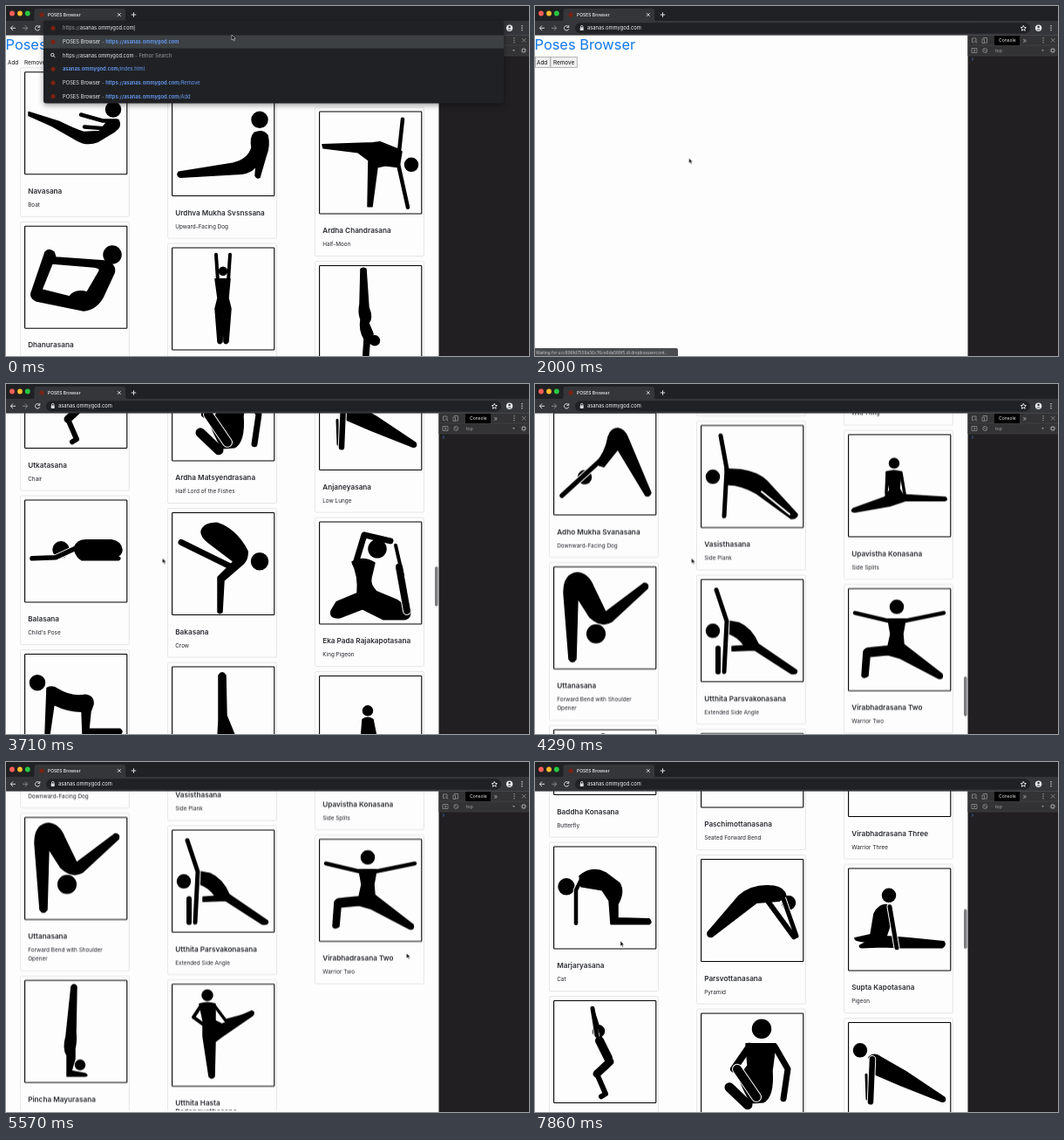
Write an HTML page that moves like this. It is 600 px wide and 401 px high and loops after 8000 ms.

```html
<!DOCTYPE html>
<html lang="en">
<head>
<meta charset="utf-8">
<title>Poses Browser</title>
<style>
@property --s { syntax: '<number>'; inherits: true; initial-value: 0; }
html, body { margin: 0; width: 100%; height: 100%; overflow: hidden; background: #fefdfe; }
svg { display: block; width: 600px; height: 401px; font: 5.8px Inter, "Open Sans", sans-serif; animation: scroll 8s -5ms infinite; }
text { white-space: pre; }

/* everything moves in 56 even steps per loop */
.doc { transform: translateY(calc(var(--s) * -1px)); }
.thumb { transform: translateY(calc(var(--s) * .1283px)); animation: bar 8s -5ms step-end infinite; }
.cards { animation: cards 8s -5ms step-end infinite; }
.late { animation: late 8s -5ms step-end infinite; }
.wait { animation: wait 8s -5ms step-end infinite; }
.menu { animation: menu 8s -5ms step-end infinite; filter: drop-shadow(0 2px 3px rgba(0,0,0,.4)); }
.hand, .over { animation: over 8s -5ms step-end infinite; }
.arrow, .plain { animation: plain 8s -5ms step-end infinite; }
.col2 { animation: settle 8s -5ms step-end infinite; }
.cursor { animation: move 8s -5ms infinite; }

@keyframes scroll {
  0%, 35.714% { --s: 0; animation-timing-function: step-end; }
  37.5% { --s: 137; animation-timing-function: steps(5); }
  46.429% { --s: 1365; animation-timing-function: steps(4); }
  53.571% { --s: 2347.5; animation-timing-function: step-end; }
  55.357%, 85.714% { --s: 2493.5; animation-timing-function: step-end; }
  87.5% { --s: 2383; animation-timing-function: steps(6); }
  98.214%, 100% { --s: 1048; }
}
@keyframes move {
  0% { transform: translate(259px, 33px); animation-timing-function: steps(7); }
  12.5%, 16.071% { transform: translate(162px, 48px); animation-timing-function: steps(6); }
  26.786%, 60.714% { transform: translate(179.5px, 199.5px); animation-timing-function: steps(4); }
  67.857%, 78.571% { transform: translate(459.5px, 219px); animation-timing-function: steps(3); }
  83.929%, 100% { transform: translate(98px, 205px); }
}
@keyframes bar { 0%, 66.071% { opacity: 0; } 37.5%, 87.5%, 100% { opacity: 1; } }
@keyframes cards { 0%, 26.786%, 100% { opacity: 1; } 7.143% { opacity: 0; } }
@keyframes late { 0% { opacity: 0; } 7.143%, 100% { opacity: 1; } }
@keyframes wait { 0%, 26.786%, 100% { opacity: 0; } 7.143% { opacity: 1; } }
@keyframes menu { 0% { opacity: 1; } 3.571%, 100% { opacity: 0; } }
@keyframes over { 0%, 17.857%, 100% { opacity: 0; } 8.929% { opacity: 1; } }
@keyframes plain { 0%, 17.857%, 100% { opacity: 1; } 8.929% { opacity: 0; } }
@keyframes settle { 0% { transform: translateY(10px); } 7.143%, 100% { transform: none; } }

.head { font-size: 16.4px; }
.name { font-size: 8.2px; font-weight: 600; fill: #2a2d31; }
.sub { font-size: 6.4px; fill: #212529; }
.pose { stroke: #000; stroke-width: 1.5; stroke-linecap: round; stroke-linejoin: round; }
.icon { fill: none; stroke: #dadce0; stroke-width: 1; }
.tool { fill: none; stroke: #919191; stroke-width: .8; }
.link { fill: #669df6; }
.b { font-weight: 600; }
.dim { fill: #9aa0a6; }
.fav { fill: #7b2114; }
</style>
</head>
<body>
<svg viewBox="0 0 600 401">
  <defs>
    <clipPath id="flow"><rect y="70.5" width="496" height="2822.5"/></clipPath>
  </defs>
  <rect width="600" height="401" fill="#fefdfe"/>

  <g class="doc">
    <g class="head">
      <text class="plain" y="50.3" x="-.5" fill="#0f78ea">Poses Browser</text>
      <text class="over" y="50.3" x="-.5" fill="#0b55ad" text-decoration="underline">Poses Browser</text>
    </g>
    <g class="late" fill="#efefef" stroke="#8a8a8a" stroke-width=".6">
      <rect x=".3" y="58.3" width="17.6" height="12"/>
      <rect x="17.9" y="58.3" width="30.3" height="12"/>
    </g>
    <g font-size="6.4" fill="#111"><text x="2" y="66.7">Add</text><text x="21" y="66.7">Remove</text></g>
    <g class="cards"><g id="cards" clip-path="url(#flow)"></g></g>
  </g>
  <rect class="thumb" x="492" y="34" width="3.6" height="45.5" rx="1.8" fill="#7d7d7f"/>
  <g class="wait">
    <path d="M0 392H162Q164 392 164 394V401H0Z" fill="#4b4c50"/>
    <text x="1" y="398.6" font-size="4.75" fill="#c6c9cd">Waiting for ucc896fd7559a36c76ce6da588f5.dl.dropboxusercont...</text>
  </g>

  <!-- developer tools -->
  <rect x="496.5" y="33.5" width="104" height="368" fill="#211f21"/>
  <path d="M496.5 33.5H600V57H496.5Z" fill="#333335"/>
  <path d="M496.5 45H600M496.5 57H600" stroke="#47474a" stroke-width=".6"/>
  <rect x="527" y="34" width="29" height="11" fill="#000"/>
  <text x="532" y="41.2" font-size="5.1" fill="#eee">Console</text>
  <g font-size="5.1" fill="#a5a5a5"><text x="528" y="52.6">top</text><text x="559.5" y="41.8" font-size="8">»</text></g>
  <g class="tool">
    <path d="M506 42V37H501.5V41.5H503.5M504 39.5L507 42.5M514 36.5H518.5V42H515.5M513 38H515.5V42.5H513Z"/>
    <path d="M501 48.5H507V53.5H501ZM503 49.8L505.2 51L503 52.2"/>
    <circle cx="516.3" cy="51" r="2.5"/><path d="M514.6 49.3L518 52.7"/>
    <path d="M592 37L596.5 41.5M596.5 37L592 41.5"/>
    <circle cx="594" cy="51" r="1.8" stroke-width="1.3"/>
    <circle cx="594" cy="51" r="2.9" stroke-dasharray="1.1 1.18"/>
  </g>
  <path d="M581 50L584 50L582.5 52Z" fill="#919191"/>
  <g fill="#a0a0a0"><circle cx="583" cy="36.8" r=".7"/><circle cx="583" cy="39.3" r=".7"/><circle cx="583" cy="41.8" r=".7"/></g>
  <path d="M501 59.5L502.8 61L501 62.5" fill="none" stroke="#3f72c4" stroke-width=".8"/>

  <!-- browser frame -->
  <rect width="600" height="17.5" fill="#202124"/>
  <rect y="17" width="600" height="16.6" fill="#35363a"/>
  <path d="M30 17.5Q32.5 17.5 32.5 14V6Q32.5 3 35.5 3H134Q137 3 137 6V14Q137 17.5 140 17.5Z" fill="#35363a"/>
  <circle cx="7" cy="8.5" r="2.9" fill="#ff5f57"/>
  <circle cx="16" cy="8.5" r="2.9" fill="#febc2e"/>
  <circle cx="24.8" cy="8.5" r="2.9" fill="#28c840"/>
  <circle class="fav" cx="41" cy="10" r="2.6"/>
  <text x="48" y="11.9" font-size="5" font-weight="500" fill="#f1f3f4">POSES Browser</text>
  <g class="icon">
    <path d="M128 8.2L131.6 11.8M131.6 8.2L128 11.8M143.8 10H149.2M146.5 7.3V12.7"/>
    <path d="M11 25.3H5.5M8 22.5L5.3 25.3L8 28.1"/>
    <path d="M19 25.3H24.5M22 22.5L24.7 25.3L22 28.1" stroke="#85878a"/>
    <path d="M38.3 23.7A2.7 2.7 0 1 0 38.7 26.3M38.8 22.2V24.4H36.5"/>
  </g>
  <rect x="46" y="19.2" width="522" height="12.4" rx="6.2" fill="#202124"/>
  <rect x="51.7" y="24.5" width="4" height="3.5" rx=".4" fill="#dadce0"/>
  <path class="icon" d="M52.5 24.8V23.6A1.2 1.2 0 0 1 54.9 23.6V24.8" stroke-width=".7"/>
  <text x="60" y="27.4" fill="#f1f3f4">asanas.ommygod.com</text>
  <path class="icon" d="M560.3 22.3L561.2 24.4L563.4 24.6L561.7 26.1L562.2 28.3L560.3 27.1L558.4 28.3L558.9 26.1L557.2 24.6L559.4 24.4Z" stroke-width=".7"/>
  <circle cx="577.6" cy="25.3" r="3.7" fill="#e8eaed"/>
  <circle cx="577.6" cy="24" r="1.2" fill="#35363a"/><path d="M575.3 27.5Q577.6 25.3 579.9 27.5Z" fill="#35363a"/>
  <g fill="#dadce0"><circle cx="592" cy="22.8" r=".75"/><circle cx="592" cy="25.3" r=".75"/><circle cx="592" cy="27.8" r=".75"/></g>

  <!-- address suggestions -->
  <g class="menu" fill="#e8eaed">
    <rect x="43" y="16.5" width="528" height="95" rx="3" fill="#202124"/>
    <rect x="43" y="33.5" width="528" height="15" fill="#3c4043"/>
    <g class="fav"><circle cx="54" cy="25.3" r="2.6"/><circle cx="54" cy="41" r="2.6"/><circle cx="54" cy="72.3" r="2.6"/><circle cx="54" cy="88" r="2.6"/><circle cx="54" cy="103.5" r="2.6"/></g>
    <text x="65" y="27.4"><tspan class="dim">https://</tspan>asanas.ommygod.com</text>
    <path d="M147.3 22V28.5" stroke="#e8eaed" stroke-width=".5"/>
    <text x="65" y="43.2">POSES Browser<tspan class="dim"> - </tspan><tspan class="link b">https://asanas.ommygod.com</tspan></text>
    <g class="icon" stroke-width=".9"><circle cx="53.3" cy="56" r="1.7"/><path d="M54.5 57.2L56.4 59.1"/></g>
    <text x="65" y="58.8">https://asanas.ommygod.com<tspan class="dim"> - Felnor Search</tspan></text>
    <text x="65" y="74.4" class="link"><tspan class="b">asanas.ommygod.com</tspan>/index.html</text>
    <text x="65" y="90.1">POSES Browser<tspan class="dim"> - </tspan><tspan class="link"><tspan class="b">https://asanas.ommygod.com</tspan>/Remove</tspan></text>
    <text x="65" y="105.7">POSES Browser<tspan class="dim"> - </tspan><tspan class="link"><tspan class="b">https://asanas.ommygod.com</tspan>/Add</tspan></text>
  </g>

  <g class="cursor" stroke="#fff" stroke-width=".5">
    <path class="arrow" d="M0 0V6L1.4 4.8L2.4 7L3.4 6.5L2.4 4.4H4.2Z" fill="#000"/>
    <path class="hand" d="M.4 .6Q1.2 -.3 1.7 .7V3L4.6 3.6Q5.4 4 5 5.5L4.4 7.5H1.3L-.9 4.8Q-.8 3.7 .4 4.4Z" fill="#fff" stroke="#111" stroke-width=".7"/>
  </g>
</svg>

<script>
// Each pose: head "x y r", then parts. "M..." is filled, "5M..." is a limb
// five units thick, and "~" gives a limb a white edge.
const poses = {
  boat: ['102 43 8.5', 'M5 46L40 57Q58 66 68 69L86 68L96 56L108 55Q112 62 104 68L84 80Q72 85 60 78L32 62L5 50Z', '4.5M65 49L90 56L106 56', '4.5M69 63L94 65'],
  bow: ['101 33 10', 'M24 30Q28 25 34 30L36 36L92 40Q106 44 103 54L90 82Q82 96 68 97L14 86Q5 82 9 74ZM32 43L20 73L52 81Q58 72 72 76L86 52Q88 48 80 47Z'],
  updog: ['101 30 9', 'M8 90L70 80Q88 76 92 62Q90 50 95 45Q105 41 110 48Q113 60 108 72L101 96Q98 98 96 94L97 82Q94 90 80 92L10 96Q5 94 8 90Z'],
  raise: ['59 27 4.5', 'M50 36L67 36L65 58L68 70L65 108Q62 112 60 108L59 74L58 108Q55 112 53 108L50 70L53 58Z', '4M51 8L53 38', '4M67 8L65 38'],
  moon: ['106 61 7.5', 'M4 38L62 36L70 35L90 43L95 46L92 64L76 62L67 64L61 109L56 109L57 56L45 47L5 42Z', '4.5M96 9L92 46', '4.5M90 56L102 110'],
  stand: ['64 86 5.5', 'M48 4Q51 2 54 4L57 48Q62 60 57 66L62 78Q62 85 58 90L56 114L50 114L52 84Q46 74 48 62Q45 54 47 44Z'],
  chair: ['52 35 6.5', '~5M45 9L50 40', '3M45 9L55 40', '10M53 46L63 66', '9M65 70L50 84', '6M50 84L60 107L55 110'],
  child: ['42 57 9', '~5.5M9 67L36 66L62 54', 'M57 56Q60 45 72 46L100 46Q111 48 112 57Q112 64 104 65L108 65Q112 67 108 69L66 69Q60 66 57 56Z'],
  cow: ['15 33 8.5', 'M26 39Q32 36 38 40Q54 50 70 47Q80 48 79 58L76 66L74 86L110 86Q114 89 110 92L67 92L66 66Q50 66 34 58L29 92L24 92Z'],
  cat: ['15 46 9', '~4.5M32 38L26 50L26 88', 'M30 34Q44 22 60 30L76 42Q82 52 74 66L74 82L110 83Q114 87 110 89L66 89L64 62L56 50L32 46Z'],
  crow: ['101 56 9.5', 'M34 22Q36 12 52 12Q74 19 87 44Q88 53 82 59L60 78L58 114Q55 117 53 114L53 74L71 56L42 34Q34 28 34 22Z', '7M11 34L66 61'],
  pigeon: ['67 31 10', 'M38 46Q50 39 64 47L60 64Q58 72 66 80L90 90L104 100Q107 110 98 112L74 112L50 100L24 110Q12 111 14 102L20 92L44 82Q46 62 38 46Z', '7M42 48L52 15L82 22', '~8M101 102L92 52', '4M88 27L96 62'],
  candle: ['80 104 7', 'M54 10Q58 4 62 10L63 56L72 78L70 94L60 106L20 108L20 103L52 98L54 62Z'],
  seat: ['56 40 5.5', 'M50 50Q56 46 62 50L66 70L78 92L92 100L20 100L34 92L48 76Z'],
  twist: ['70 18 10.5', 'M52 35L86 35L82 66Q84 96 72 102L58 103Q50 90 44 74L54 60Z', '8M56 38L38 64', '7M85 38L100 64L95 98', '~10M42 64L64 96', '11M33 85L54 105'],
  plank: ['14 32 7.5', 'M24 40Q30 34 38 40L66 56L111 86Q113 91 108 91L60 72L32 60Z', '3M21 60L22 88', '~6.5M28 42L26 91'],
  down: ['36 74 7.5', '~5.5M10 95L56 53', 'M48 59Q60 46 63 28Q66 18 74 18Q82 19 86 30L112 92Q110 97 106 95L74 42L58 62Z'],
  side: ['14 59 7.5', 'M28 50L46 51Q66 54 76 64L111 102Q111 107 104 107L64 78Q46 68 31 68Z', '5M23 12L30 50L27 104', '~0M70 76L102 102'],
  split: ['53 33 5.5', 'M44 43Q53 40 61 43L59 62L63 69L112 72Q115 75 111 76L66 76L48 82L8 89Q2 88 6 85L42 72L48 64Z', '3.5M45 44L44 68', '3.5M61 44L65 68'],
  fold: ['49 77 10.3', 'M18 106L12 30Q12 8 28 7Q40 8 46 23L60 52L104 19Q110 19 108 25L68 62Q56 71 42 58L28 36L26 106Q22 112 18 106Z'],
  angle: ['14 59 7.5', 'M28 47L44 50Q58 56 66 74L110 104Q112 109 104 108L62 81L36 82L36 77L50 76Q44 66 32 62Z', '6M20 79L20 106', '~5M18 12L30 48L27 106'],
  warrior: ['56 21 7.5', 'M46 35L66 35L63 52L64 64L108 98Q110 104 104 103L60 80L46 76L25 78L23 100Q18 104 16 100L18 72Q20 68 26 68L46 66L49 52Z', '4.5M8 28L46 37L66 37L110 28'],
  forearm: ['64 97 5.5', 'M54 7Q57 3 60 7L59 60Q60 70 58 78L58 90L54 104L70 107Q74 109 70 110L49 110L49 86Q44 78 48 64Z'],
  toe: ['41 13 6', 'M32 23Q41 20 50 23L50 42L58 46L92 31Q96 32 93 36L58 60L50 66L49 106Q46 110 43 106L36 60L36 42Z', '4M33 26L25 38L36 46', '3.5M50 26L62 42L92 34'],
  pyramid: ['101 50 7.5', '~5M93 40L110 88', 'M8 84L44 42Q60 28 84 31Q96 33 98 42L90 48L64 50L13 89Q7 90 8 84Z', '6M74 44L107 89'],
  rest: ['47 31 7.5', 'M30 52Q36 40 46 42L50 60L44 78L70 80L110 84Q113 88 108 91L60 91L40 90L16 91Q12 90 14 88L22 84Q8 84 8 80L26 76Z', '~5M48 44L56 91']
};

// name | meaning | pose, with "/" for a line break
const columns = [
  { x: 21, y: 75.5, list: `Navasana|Boat|boat
Dhanurasana|Bow|bow
Virasana|Hero with Arms/Overhead|raise
Ustrasana|Camel|pigeon
Sukhasana|Easy Pose|seat
Baddha Konasana|Butterfly|seat
Marjaryasana|Cat|cat
Utkatasana|Chair|chair
Balasana|Child's Pose|child
Bitilasana|Cow|cow
Bhujangasana|Cobra|updog
Kapotasana|Dove|pigeon
Phalakasana|Plank|plank
Adho Mukha Svanasana|Downward-Facing Dog|down
Uttanasana|Forward Bend with Shoulder/Opener|fold
Pincha Mayurasana|Forearm Stand|forearm` },
  { x: 190, y: -76.2, list: `Pincha Mayurasana|Forearm Stand|forearm
Urdhva Mukha Svsnssana|Upward-Facing Dog|updog
Urdhva Hastasana|Upward Salute|raise
Trikonasana|Triangle|moon
Malasana|Garland|twist
Ardha Navasana|Half-Boat|boat
Paschimottanasana|Seated Forward Bend|child
Parsvottanasana|Pyramid|pyramid
Ardha Matsyendrasana|Half Lord of the Fishes|twist
Bakasana|Crow|crow
Salamba Sarvangasana|Shoulder Stand|candle
Parighasana|Gate|angle
Tadasana|Mountain|raise
Anantasana|Side-Reclining|side
Vasisthasana|Side Plank|side
Utthita Parsvakonasana|Extended Side Angle|angle
Utthita Hasta/Padangusthasana|Extended Hand to Toe|toe` },
  { x: 359, y: -76, list: `Utthita Hasta/Padangusthasana|Extended Hand to Toe|toe
Ardha Chandrasana|Half-Moon|moon
Adho Mukha Vrksasana|Handstand|stand
Vrksasana|Tree|raise
Hanumanasana|Front Splits|split
Halasana|Plow|fold
Virabhadrasana Three|Warrior Three|boat
Supta Kapotasana|Pigeon|rest
Anjaneyasana|Low Lunge|plank
Eka Pada Rajakapotasana|King Pigeon|pigeon
Siddhasana|Accomplished|seat
Dandasana|Staff|rest
Natarajasana|Dancer|toe
Camatkarasana|Wild Thing|side
Upavistha Konasana|Side Splits|split
Virabhadrasana Two|Warrior Two|warrior` }
];

const LINE = 10.3;

function drawPose([head, ...parts]) {
  const [x, y, r] = head.split(' ');
  const shapes = parts.map(part => {
    const [, edge, w, d] = part.match(/^(~?)([\d.]*)(M.*)/);
    if (!w) return `<path d="${d}" fill-rule="evenodd"/>`;
    const limb = (color, width) => `<path d="${d}" fill="none" stroke="${color}" stroke-width="${width}"/>`;
    return (edge ? limb('#fefdfe', +w + 2) : '') + (+w ? limb('#000', w) : '');
  });
  return `<g class="pose"><circle cx="${x}" cy="${y}" r="${r}"/>${shapes.join('')}</g>`;
}

const lines = (rows, cls, y) =>
  rows.map((row, i) => `<text class="${cls}" x="4.2" y="${y + i * LINE}">${row}</text>`).join('');

function drawColumn({ x, y, list }, n) {
  const cards = list.split('\n').map(entry => {
    const [name, sub, pose] = entry.split('|');
    const names = name.split('/'), subs = sub.split('/');
    const nameExtra = (names.length - 1) * LINE;
    const extra = nameExtra + (subs.length - 1) * LINE;
    const card = `<g transform="translate(${x} ${y})">
      <rect x="-4.6" y="-4.7" width="125" height="${170.5 + extra}" rx="1.6" fill="#fefdfe" stroke="#dcdcdd" stroke-width=".7"/>
      <rect x=".6" y=".2" width="117.2" height="117" rx=".8" fill="none" stroke="#000" stroke-width="1.1"/>
      ${drawPose(poses[pose])}${lines(names, 'name', 139.4)}${lines(subs, 'sub', 154.4 + nameExtra)}</g>`;
    y += 176.5 + extra;
    return card;
  });
  return `<g class="col${n}">${cards.join('')}</g>`;
}

document.getElementById('cards').innerHTML = columns.map(drawColumn).join('');
</script>
</body>
</html>
```
